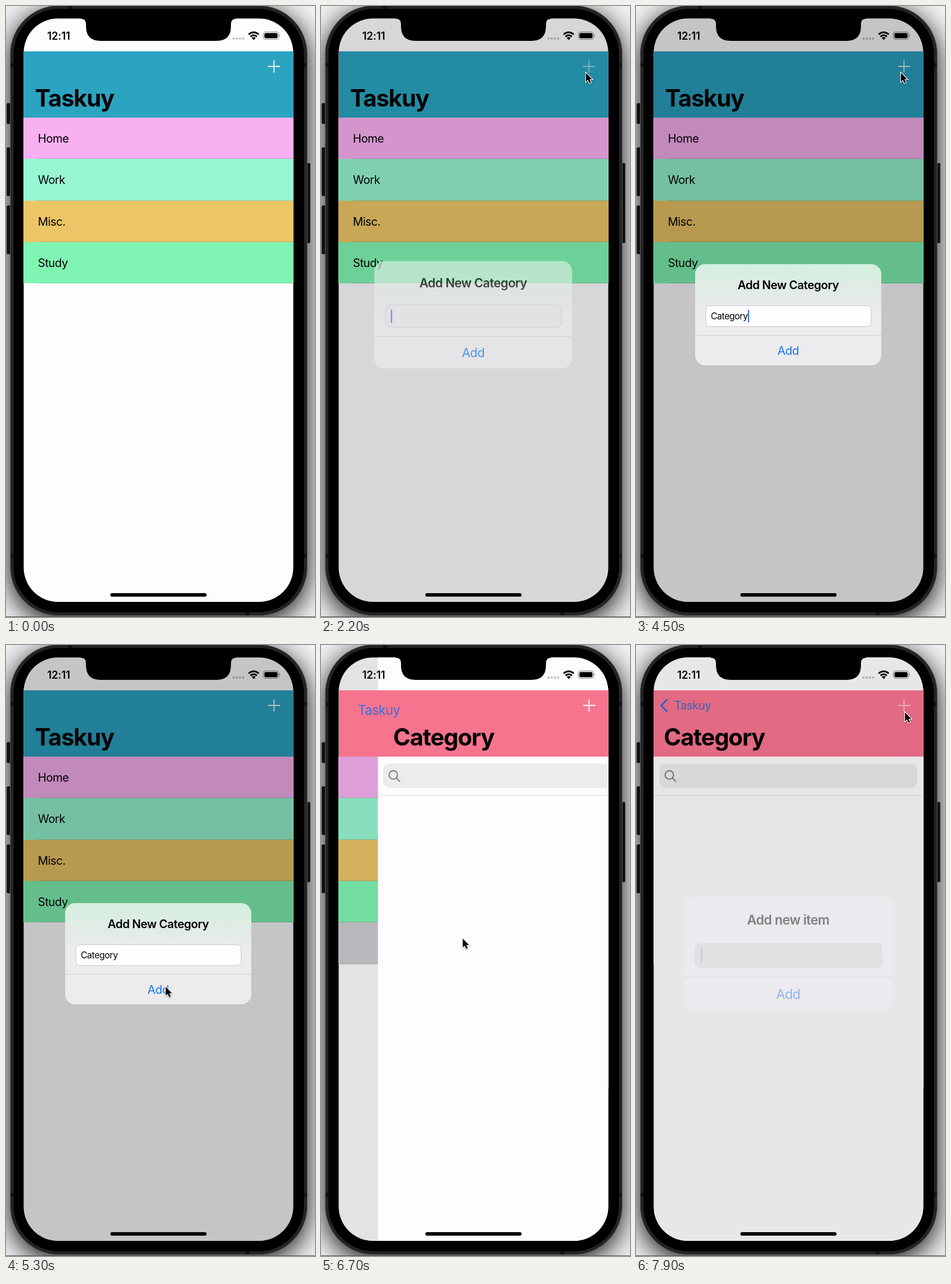
An HTML page that plays this animation: 533 by 1051 pixels, repeating every 8000 ms.

```html
<!DOCTYPE html>
<html lang="en">
<head>
<meta charset="utf-8">
<title>To-do list on a phone</title>
<style>
  html, body { margin: 0; width: 100%; height: 100%; overflow: hidden; }
  body {
    position: relative;
    background: #f4f2f4;
    font-family: Inter, "Open Sans", sans-serif;
    font-size: 19.7px; letter-spacing: -.025em; color: #000;
    --spring: cubic-bezier(.3, .5, .5, 1);
  }
  div, svg, span { position: absolute; box-sizing: border-box; }
  .fill { left: 0; top: 0; width: 533px; height: 1051px; }
  .text { line-height: 40px; white-space: pre; }
  .anim { animation: 8s linear infinite paused; }

  /* Phone body */
  .key { background: #1d1d1e; border: 1px solid #454446; border-radius: 2px; }
  .left { left: 1px; width: 8px; }
  .right { left: 517px; width: 8px; }
  .case { left: 7px; top: -1px; width: 513px; height: 1050px; border-radius: 84px;
    background: #000; border: 1px solid #5a595b; box-shadow: inset 0 0 0 5px #242425, 0 10px 46px #000000f0; }
  .band { background: #111; }
  .floor { left: 0; top: 1050px; width: 533px; height: 1px; background: #555456; }
  .screen { clip-path: inset(21.5px 37.5px 26px 30.5px round 59px); background: #fefcff; }

  /* List */
  .row { left: 30px; width: 466px; height: 71.4px; }
  .row::after { content: ""; position: absolute; left: 25px; right: 0; bottom: 0; height: 1px; background: #3c3c4333; }
  .row .text { left: 25px; top: 16px; }
  .new { animation-name: new; }
  .shade { background: #000; opacity: 0; animation-name: shade; }
  .list { animation-name: list; }
  .page { animation-name: page; transform: translateX(466px); }
  .page > .sheet { left: 31px; top: 0; width: 466px; height: 1051px; background: #fefcff; }
  .search { left: 40px; top: 204px; width: 445px; height: 42px; border-radius: 12px; background: #ecebee; }
  .rule { left: 31px; top: 258px; width: 466px; height: 1px; background: #dcdbde; }

  /* Navigation bar */
  .bar { left: 30px; top: 78px; width: 466px; height: 114px; background: #2ba4c2; animation-name: bar; }
  .big { top: 139px; font-size: 40.5px; font-weight: 700; letter-spacing: -.03em; transform-origin: 0 50%; }
  .old { left: 50px; animation-name: old; }
  .next { left: 48px; animation-name: next; }
  .back { left: 66px; top: 84px; color: #2d70da; transform-origin: 0 50%; animation-name: back; }
  .chevron { animation-name: chevron; }
  .plus { animation-name: plus; }

  /* Alerts */
  .dim { background: #000; opacity: 0; animation-name: dim; }
  .alert { left: 102px; top: 444px; width: 321px; height: 174px; border-radius: 17px;
    background: #f2f0f3; opacity: 0; text-align: center; }
  .first { background: linear-gradient(#d4efdf, #e1ebe5 25%, #ecebed 50%); animation-name: first; }
  .second { animation-name: second; }
  .alert > .text { left: 0; width: 321px; }
  .head { top: 16px; font-size: 20px; font-weight: 600; }
  .add { top: 129px; font-size: 20px; color: #1877ec; }
  .line { left: 0; top: 122px; width: 321px; height: 1px; background: #cbcacd; }
  .field { left: 18px; top: 71px; width: 286px; height: 37px; border: 1px solid #c9c8cb; border-radius: 8px;
    background: #dad9dc; text-align: left; font-size: 15.5px; }
  .first .field { animation-name: field; }
  .field .text { left: 8px; top: -2px; }
  .field i { display: inline-block; width: 2.4px; height: 21px; vertical-align: -5px; background: #2c6be6; }
  .second i { background: #6fb4ee; }

  .cursor { left: 0; top: 0; width: 18px; height: 26px; overflow: visible;
    filter: drop-shadow(0 1px 1px #0005); animation-name: cursor; }
  .home { left: 180px; top: 1009.5px; width: 166px; height: 6px; border-radius: 3px; background: #000; }
  .clock { left: 71px; top: 31px; font-size: 18.3px; font-weight: 600; letter-spacing: -.01em; }

  @keyframes new { 0%, 72.49% { visibility: hidden; background: #f7748f; }
    72.5%, 78.74% { visibility: visible; background: #f7748f; }
    78.75%, 100% { visibility: visible; background: #cdccd0; } }
  @keyframes list { 0%, 80.25% { transform: none; animation-timing-function: var(--spring); }
    86.5%, 100% { transform: translateX(-139px); } }
  @keyframes shade { 0%, 80.25% { opacity: 0; animation-timing-function: var(--spring); }
    86.5%, 100% { opacity: .12; } }
  @keyframes page { 0%, 80.25% { transform: translateX(466px); animation-timing-function: var(--spring); }
    86.5%, 100% { transform: none; } }
  @keyframes bar { 0%, 80.25% { background: #2ba4c2; } 82.5%, 100% { background: #f7748f; } }
  @keyframes old { 0%, 80.25% { transform: none; opacity: 1; }
    82.5%, 100% { transform: translate(9px, -33px) scale(.7); opacity: 0; } }
  @keyframes next { 0%, 80.25% { transform: translateX(530px); animation-timing-function: var(--spring); }
    86.5%, 100% { transform: none; } }
  @keyframes back { 0%, 80.24% { visibility: hidden; }
    80.25% { visibility: visible; transform: translate(-18px, 58px) scale(2.05); opacity: .4; animation-timing-function: var(--spring); }
    86.5%, 100% { visibility: visible; transform: none; opacity: 1; } }
  @keyframes chevron { 0%, 83.75% { opacity: 0; } 87.5%, 100% { opacity: 1; } }
  @keyframes plus { 0%, 23.74% { opacity: 1; } 23.75%, 29% { opacity: .5; } 43% { opacity: .7; }
    66% { opacity: .9; } 72.5%, 97.49% { opacity: 1; } 97.5%, 100% { opacity: .55; } }
  @keyframes dim { 0%, 25% { opacity: 0; animation-timing-function: var(--spring); }
    31.25%, 66.25% { opacity: .222; animation-timing-function: var(--spring); }
    72.5%, 97.5% { opacity: 0; } 100% { opacity: .172; } }
  @keyframes first { 0%, 25% { opacity: 0; transform: scale(1.2); animation-timing-function: var(--spring); }
    31.25%, 66.25% { opacity: 1; transform: none; animation-timing-function: var(--spring); }
    72.5%, 100% { opacity: 0; transform: none; } }
  @keyframes second { 0%, 97.5% { opacity: 0; transform: scale(1.2); }
    100% { opacity: .9; transform: scale(1.056); } }
  @keyframes field { 0%, 27.5% { background: #e8e7e9; } 31.25%, 100% { background: #fefdff; } }
  @keyframes cursor {
    0%, 14.99% { opacity: 0; transform: translate(400px, 300px); }
    15% { opacity: 1; transform: translate(400px, 300px); animation-timing-function: ease-out; }
    21.25%, 57.5% { transform: translate(457px, 115px); animation-timing-function: ease-in-out; }
    63.75%, 68.75% { transform: translate(275.5px, 588px); animation-timing-function: ease-in-out; }
    73.75%, 76.25% { transform: translate(244px, 486px); }
    78.75%, 90% { transform: translate(244.5px, 505px); animation-timing-function: ease-in-out; }
    96.25%, 100% { opacity: 1; transform: translate(464px, 116px); }
  }
</style>
</head>
<body>
  <div class="key left" style="top:167px;height:36px"></div>
  <div class="key left" style="top:243px;height:84px"></div>
  <div class="key left" style="top:343px;height:84px"></div>
  <div class="key right" style="top:270px;height:138px"></div>
  <div class="case"></div>
  <div class="floor"></div>
  <div class="band" style="left:8px;top:98px;width:5px;height:7px"></div>
  <div class="band" style="left:514px;top:98px;width:5px;height:7px"></div>
  <div class="band" style="left:8px;top:942px;width:5px;height:7px"></div>
  <div class="band" style="left:514px;top:942px;width:5px;height:7px"></div>
  <div class="band" style="left:107px;top:0;width:7px;height:5px"></div>
  <div class="band" style="left:413px;top:1043px;width:7px;height:5px"></div>

  <div class="screen fill">
    <div class="list anim fill" id="list"></div>
    <div class="shade anim fill"></div>
    <div class="page anim fill">
      <div class="sheet"></div>
      <div class="search"></div>
      <div class="rule"></div>
      <svg class="fill" fill="none" stroke="#77767a" stroke-width="1.9" stroke-linecap="round">
        <circle cx="57.5" cy="223.5" r="7.3"/><path d="M63 229l5.800 5.800"/>
      </svg>
    </div>

    <div class="bar anim"></div>
    <div class="old big text anim">Taskuy</div>
    <div class="next big text anim">Category</div>
    <div class="back text anim">Taskuy</div>
    <svg class="chevron anim fill" fill="none" stroke="#2d70da" stroke-width="3" stroke-linecap="round" stroke-linejoin="round">
      <path d="M53 94.500L43.500 104.300L53 114"/>
    </svg>
    <svg class="plus anim fill" stroke="#fff" stroke-width="1.8"><path d="M452 104H473M462.300 93.500V114.500"/></svg>

    <div class="clock text">12:11</div>
    <svg class="fill">
      <g fill="#bfbec0" id="dots"></g>
      <g fill="none" stroke="#000" stroke-width="2.9">
        <path d="M418.500 48.800Q427.200 41.800 436 48.800"/><path d="M421.700 52.600Q427.200 48 432.800 52.600"/>
      </g>
      <path d="M423.800 54.800Q427.200 52 430.700 54.800L427.200 58.500Z"/>
      <rect x="443.800" y="44.500" width="26.500" height="13" rx="4" fill="none" stroke="#8d8c8f" stroke-width="1.100"/>
      <rect x="445.700" y="46.400" width="22.700" height="9.200" rx="2.300"/>
      <path d="M471.500 48.800Q474 51 471.500 53.200Z" fill="#8d8c8f"/>
    </svg>

    <div class="dim anim fill"></div>
    <div class="first alert anim">
      <div class="head text">Add New Category</div>
      <div class="field anim"><span class="text"><span id="typed" style="position:static"></span><i id="caret"></i></span></div>
      <div class="line"></div>
      <div class="add text">Add</div>
    </div>
    <div class="second alert anim">
      <div class="head text">Add new item</div>
      <div class="field"><span class="text"><i></i></span></div>
      <div class="line"></div>
      <div class="add text">Add</div>
    </div>
    <div class="home"></div>
  </div>

  <svg class="fill"><path d="M129 20V22Q138 22 138 31V35Q138 60 163 60H363Q388 60 388 35V31Q388 22 397 22V20Z"/></svg>
  <svg class="cursor anim">
    <path d="M0 0V15.200L3.500 12L5.900 17.800L8.600 16.700L6.200 11H10.800Z" stroke="#fff" stroke-width="2.200" paint-order="stroke"/>
  </svg>

<script>
  const LOOP = 8000, STEP = 100;
  const $ = id => document.getElementById(id);

  const rows = [["Home", "#f9b0f1"], ["Work", "#97f7d2"], ["Misc.", "#ecc566"], ["Study", "#80f5b3"], ["Category", ""]];
  $("list").innerHTML = rows.map(([name, color], i) =>
    `<div class="row ${color ? "" : "new anim"}" style="top:${192 + i * 71.3}px;${color && "background:" + color}">` +
    `<div class="text">${name}</div></div>`).join("");
  $("dots").innerHTML = [0, 1, 2, 3].map(i => `<circle cx="${392.5 + i * 5.5}" cy="56" r="2"/>`).join("");

  const anims = document.getAnimations();
  anims.forEach(a => a.pause());

  // The clock advances in steps, like a screen recording at ten pictures a second.
  function draw() {
    const t = Math.floor(performance.now() % LOOP / STEP) * STEP;
    for (const a of anims) a.currentTime = t;
    const count = Math.max(0, Math.floor((t - 2900) / 150));
    $("typed").textContent = "Category".slice(0, count);
    $("caret").style.visibility = t < 5100 ? "visible" : "hidden";
    requestAnimationFrame(draw);
  }
  draw();
</script>
</body>
</html>
```
